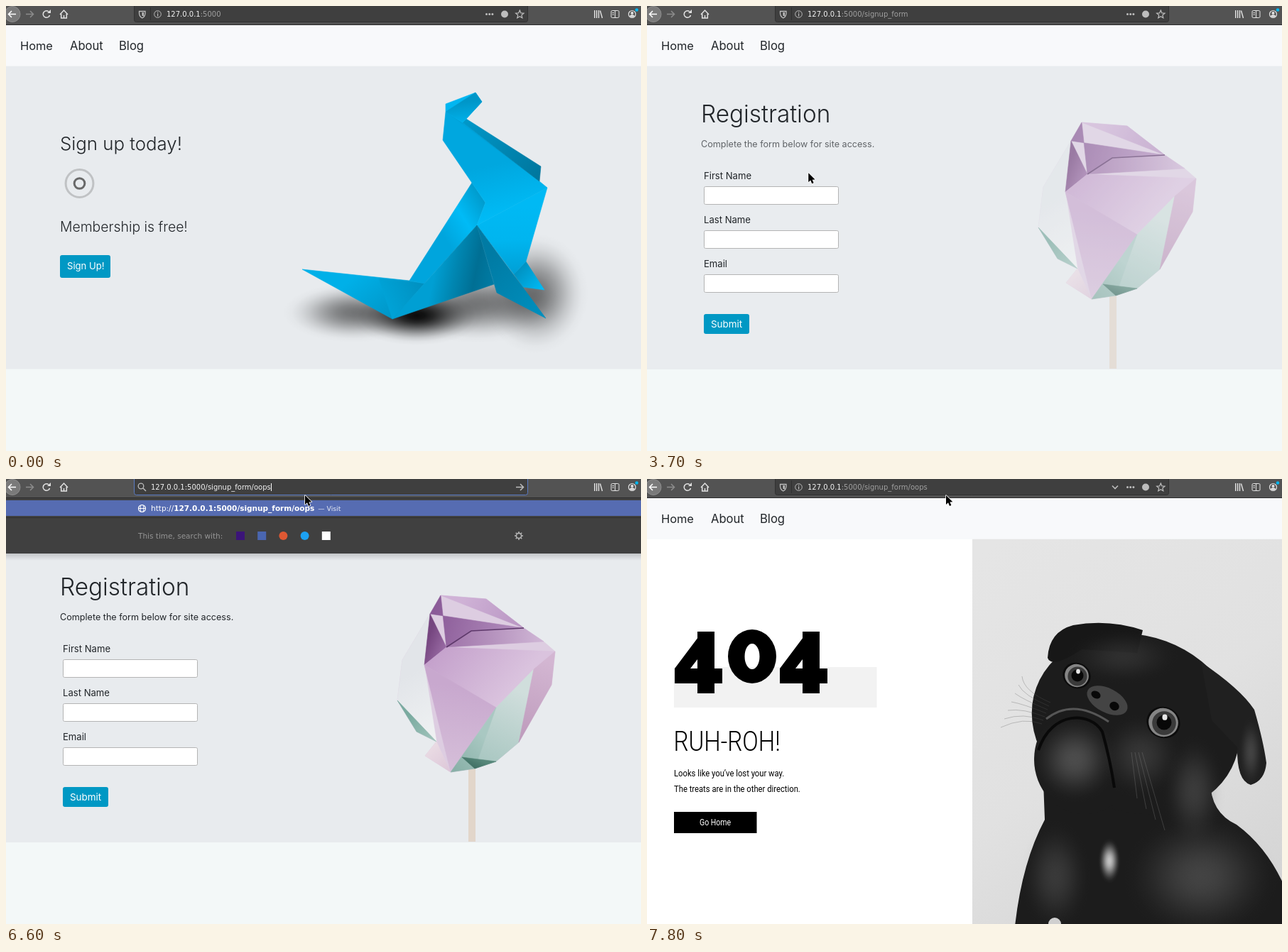
Write an HTML page with a canvas that moves like this. It is 894 px wide and 627 px high and loops after 8 s.

```html
<!DOCTYPE html>
<html lang="en">
<head>
<meta charset="utf-8">
<title>Sign-up demo</title>
<style>
html, body { margin: 0; width: 100%; height: 100%; overflow: hidden; background: #f3f8f8; }
canvas { display: block; }
</style>
</head>
<body>
<canvas id="stage" width="894" height="627"></canvas>
<script>
const c = document.getElementById('stage').getContext('2d');
const W = 894, H = 627, TOP = 84.5, LOOP = 8000;
const PAGE = '#f3f8f8', HERO = '#e8ebee', BLUE = '#0098c4', INK = '#212529';
const LIGHT = '#e2e2e2', SOFT = '#bdbdbd';
const SANS = 'Inter, sans-serif', UI = '"DejaVu Sans", sans-serif', SLIM = 'Roboto, sans-serif';

// ---------- helpers ----------
function bezier(x1, y1, x2, y2) {
  const at = (s, a, b) => 3 * (1 - s) * (1 - s) * s * a + 3 * (1 - s) * s * s * b + s * s * s;
  return x => {
    if (x <= 0) return 0;
    if (x >= 1) return 1;
    let lo = 0, hi = 1;
    for (let i = 0; i < 24; i++) {
      const mid = (lo + hi) / 2;
      if (at(mid, x1, x2) < x) lo = mid; else hi = mid;
    }
    return at(lo, y1, y2);
  };
}
const ease = bezier(.25, .1, .25, 1);
const grow = bezier(0, .2, .8, 1);
const fade = bezier(.2, 0, .8, 1);
const mix = (a, b, k) => a + (b - a) * k;

function rect(x, y, w, h, color) {
  c.fillStyle = color;
  c.fillRect(x, y, w, h);
}
function box(x, y, w, h, r, fill, edge) {
  c.beginPath();
  c.roundRect(x, y, w, h, r);
  if (fill) { c.fillStyle = fill; c.fill(); }
  if (edge) { c.strokeStyle = edge; c.lineWidth = 1; c.stroke(); }
}
function trace(p, closed) {
  c.beginPath();
  for (let i = 0; i < p.length; i += 2) c.lineTo(p[i], p[i + 1]);
  if (closed) c.closePath();
}
function poly(p, fill) {
  trace(p, true);
  c.fillStyle = fill;
  c.fill();
}
function line(p, color, width = 1) {
  trace(p);
  c.strokeStyle = color;
  c.lineWidth = width;
  c.stroke();
}
function shape(d, fill) {
  c.fillStyle = fill;
  c.fill(new Path2D(d));
}
function curve(d, color, width) {
  c.strokeStyle = color;
  c.lineWidth = width;
  c.stroke(new Path2D(d));
}
function disc(x, y, rx, ry, fill, turn = 0) {
  c.beginPath();
  c.ellipse(x, y, rx, ry, turn, 0, 7);
  c.fillStyle = fill;
  c.fill();
}
function ring(x, y, r, color, width = 1, from = 0, to = 2 * Math.PI) {
  c.beginPath();
  c.arc(x, y, r, from, to);
  c.strokeStyle = color;
  c.lineWidth = width;
  c.stroke();
}
function text(s, x, y, font, color) {
  c.font = font;
  c.fillStyle = color;
  c.fillText(s, x, y);
  return x + c.measureText(s).width;
}
function shade(x0, y0, x1, y1, colors) {
  const g = c.createLinearGradient(x0, y0, x1, y1);
  colors.forEach((k, i) => g.addColorStop(i / (colors.length - 1), k));
  return g;
}
function glow(x, y, rx, ry, grey, alpha) {
  c.save();
  c.translate(x, y);
  c.scale(rx, ry);
  const g = c.createRadialGradient(0, 0, 0, 0, 0, 1);
  for (let k = 0; k <= 1; k += .125) {
    const a = alpha * (1 + Math.cos(Math.PI * k)) / 2;
    g.addColorStop(k, `rgba(${grey},${grey},${grey},${a})`);
  }
  disc(0, 0, 1, 1, g);
  c.restore();
}
function veil(y, h, color, alpha) {
  c.globalAlpha = alpha;
  rect(0, y, W, h, color);
  c.globalAlpha = 1;
}
// Folded paper: each facet names its corners and is shaded
// from the middle of its first edge to its last corner.
function fold(corners, facets) {
  for (const [names, ...colors] of facets) {
    const p = [...names].map(k => corners[k]), [a, b] = p, z = p[p.length - 1];
    const ink = colors[1] ? shade((a[0] + b[0]) / 2, (a[1] + b[1]) / 2, z[0], z[1], colors) : colors[0];
    poly(p.flat(), ink);
    c.strokeStyle = ink;
    c.lineWidth = .6;
    c.stroke();
  }
}

// ---------- browser bar ----------
function arrow(x, dir, color) {
  const y = 11.5;
  line([x - 5 * dir, y, x + 5 * dir, y], color, 1.5);
  line([x + dir, y - 4.5, x + 5.5 * dir, y, x + dir, y + 4.5], color, 1.5);
}
function star(x, y) {
  const p = [];
  for (let i = 0; i < 10; i++) {
    const a = i * Math.PI / 5 - Math.PI / 2, r = i % 2 ? 2.7 : 6;
    p.push(x + r * Math.cos(a), y + r * Math.sin(a));
  }
  trace(p, true);
  c.strokeStyle = SOFT;
  c.lineWidth = 1.2;
  c.stroke();
}
function searchField(t) {
  ring(190, 10, 3.8, SOFT, 1.3);
  line([193, 13, 197, 17], SOFT, 1.5);
  const end = text(address(t), 204, 15, '10px ' + UI, '#f2f2f2');
  rect(Math.round(end), 6, 1, 11, '#fff');
  arrow(723, 1, SOFT);
}
function addressField(t) {
  curve('M187.5 7.5H196Q196.5 15 191.8 17Q187 15 187.5 7.5Z', SOFT, 1.3);
  rect(191.5, 9, 2.5, 5, SOFT);
  rect(203, 2, 1, 18, '#303030');
  ring(213.5, 11.5, 4.8, SOFT);
  rect(213, 10.5, 1.2, 4, SOFT);
  rect(213, 8.3, 1.2, 1.2, SOFT);
  const host = '127.0.0.1';
  const x = text(host, 226, 15, '10px ' + UI, '#f2f2f2');
  text(address(t).slice(host.length), x, 15, '10px ' + UI, '#a0a0a0');
  if (t >= 4100) line([655, 9.5, 659, 13.5, 663, 9.5], SOFT, 1.6);
  for (let i = 0; i < 3; i++) disc(676.5 + i * 4.2, 11.5, 1.5, 1.5, SOFT);
  disc(702, 11.5, 5, 5, SOFT);
  star(723.3, 12);
}
function toolbar(t, typing) {
  rect(0, 0, W, 27, '#535353');
  rect(0, 26, W, 1, '#2b2b2b');
  disc(9, 11.5, 11, 11, '#7a7a7a');
  ring(9, 11.5, 11, '#8e8e8e');
  arrow(9, -1, '#fff');
  arrow(33, 1, '#8c8c8c');
  ring(57, 11.5, 4.7, LIGHT, 1.6, .3, 5.4);
  poly([58, 10, 63, 10, 63, 5], LIGHT);
  curve('M76 12L81.5 6L87 12M77.7 11V17H85.3V11M81.5 17V13', LIGHT, 1.5);
  box(180.5, -3.5, 554, 26, 3, '#3f3f3f', typing ? '#5b7bc4' : '#323232');
  if (typing) searchField(t); else addressField(t);

  for (let i = 0; i < 3; i++) rect(828 + i * 2.9, 6, 1.4, 11, LIGHT);
  line([836.5, 6.5, 839.5, 17], LIGHT, 1.4);
  box(852, 6.5, 11, 10, 1.5, null, LIGHT);
  curve('M857.5 7V16M853.5 9.5H856M853.5 12H856', LIGHT, 1);
  ring(881.5, 11.5, 5, LIGHT, 1.2);
  disc(881.5, 10, 2, 2, LIGHT);
  disc(881.5, 14, 3.2, 1.7, LIGHT);
  disc(888, 5.5, 2.3, 2.3, '#00b7f0');
}
function address(t) {
  let s = '127.0.0.1:5000';
  if (t >= 3000) s += '/signup_form';
  if (t >= 5500) s += '/';
  if (t >= 5900) s += t < 6300 ? 'o' : t < 6600 ? 'oop' : 'oops';
  return s;
}
function dropdown(t) {
  rect(0, 105, W, 10, shade(0, 105, 0, 115, ['rgba(0,0,0,.16)', 'rgba(0,0,0,0)']));
  rect(0, 24, W, 81, '#404040');
  rect(0, 30, W, 22, '#566cb2');
  rect(0, 54, W, 1, '#2f2f2f');
  ring(191.5, 41.5, 5, '#fff', 1.2);
  line([186.5, 41.5, 196.5, 41.5], '#fff');
  c.beginPath();
  c.ellipse(191.5, 41.5, 2.3, 5, 0, 0, 7);
  c.stroke();
  let x = text('http://', 204, 45, '10.5px ' + UI, '#fff');
  x = text(address(t), x, 45, 'bold 10.5px ' + UI, '#fff');
  text('— Visit', x + 5, 45, '9.3px ' + UI, '#e8ebf5');
  text('This time, search with:', 186, 84, '10.5px ' + UI, '#949494');
  ['#3b1478', '#4a66b0', '#de5833', '#1da1f2', '#fff'].forEach((color, i) => {
    const round = i === 2 || i === 3;
    box(324 + 30.2 * i, 74, 12, 12, round ? 6 : 0, color);
  });
  ring(722, 80, 3.6, '#b5b5b5', 1.6);
  for (let i = 0; i < 8; i++) {
    const a = i * Math.PI / 4, u = Math.cos(a), v = Math.sin(a);
    line([722 + 4 * u, 80 + 4 * v, 722 + 6 * u, 80 + 6 * v], '#b5b5b5', 1.5);
  }
}
function nav() {
  rect(0, 27, W, TOP - 27, '#f8f9fb');
  text('Home', 20, 61.5, '16.4px ' + SANS, INK);
  text('About', 90, 61.5, '16.6px ' + SANS, INK);
  text('Blog', 159, 61.5, '16.6px ' + SANS, INK);
}

// ---------- home ----------
function ripple(t) {
  for (const lag of [0, .5]) {
    const p = (Math.min(t, 2400) / 1000 + .18 + lag) % 1;
    c.globalAlpha = 1 - fade(p);
    ring(103.5, 250, 24 * grow(p), '#565656', 3);
  }
  c.globalAlpha = 1;
}
const DINO = {
  A: [619, 149], B: [619, 138], C: [661, 122], D: [670, 135], E: [643, 164], F: [753, 226],
  G: [751, 247], H: [762, 256], I: [675, 277], J: [615, 189], K: [656, 249], L: [568, 387],
  M: [589, 391], N: [544, 441], O: [417, 371], P: [663, 309], Q: [687, 392], R: [691, 404],
  S: [760, 440], T: [732, 360], U: [758, 400], V: [715, 378], W: [728, 396], X: [525, 384],
  Y: [648, 159]
};
function dinosaur() {
  glow(490, 432, 100, 42, 0, .5);
  glow(578, 436, 95, 42, 0, .95);
  glow(665, 420, 115, 55, 0, .5);
  glow(745, 405, 75, 85, 0, .5);
  fold(DINO, [
    ['OLMN', '#00b0e8', '#0095c6'],
    ['NXM', '#00a2d6', '#008fbf'],
    ['KLMPI', '#00a5dd', '#00bbf6', '#009bcd'],
    ['TVWU', '#0092c2', '#00bdf8'],
    ['PHTV', '#00b9f4', '#00b5ef', '#009fd5'],
    ['NPQ', '#009fd3', '#0086b1', '#006f94', '#007ca5'],
    ['PRS', '#007ba4', '#0090bf'],
    ['IJAEGHP', '#00a7df', '#00bcf7'],
    ['AEG', '#00a3da', '#00a1d7'],
    ['EYFG', '#0098c9', '#00759c'],
    ['ABCDYE', '#00b6f1'],
    ['ACDE', '#0096c8', '#00b0e9']
  ]);
}
function home(t, spot) {
  rect(0, TOP, W, 427, HERO);
  text('Sign up today!', 76, 202.5, '300 25.8px ' + SANS, INK);
  text('Membership is free!', 76, 317.5, '300 19.4px ' + SANS, INK);
  box(76, 351, 71, 32, 3, spot && spot.hand ? '#0083a8' : BLUE);
  text('Sign Up!', 86, 371, '13.1px ' + SANS, '#fff');
  ripple(t);
  dinosaur();
}

// ---------- registration ----------
const ROSE = {
  a: [612, 164], b: [676, 169], c: [729, 210], d: [757, 229], e: [773, 243], f: [768, 290],
  g: [722, 371], h: [690, 322], i: [660, 408], j: [626, 413], k: [590, 390], l: [551, 312],
  m: [558, 255], n: [597, 190], o: [589, 262], p: [620, 237], q: [743, 268], r: [606, 370],
  s: [655, 214], u: [578, 356], w: [642, 392], x: [690, 398]
};
function rose() {
  rect(651, 400, 10, 111, '#e2d6ca');
  fold(ROSE, [
    ['abcdefgxijkrulmn', '#ddcde1'],
    ['lmnor', '#e2e5e9', '#f0f2f3'],
    ['lur', '#79aa9f', '#a3c5bd'],
    ['napsc', '#8a5a97', '#b591c0'],
    ['abc', '#cfb2d6', '#b894c2'],
    ['nop', '#75457f', '#9a6ca5'],
    ['pscd', '#a47bae', '#d0b7d6'],
    ['opeh', '#c5a2cc', '#dac3de'],
    ['ohj', '#c8a8ce', '#d6bfd9'],
    ['hqgxi', '#d0dedc', '#a4c4be'],
    ['hij', '#a9c8c2', '#86aea5'],
    ['wxi', '#568679', '#3f6f63'],
    ['qefg', '#d3b6d2', '#bd9abb'],
    ['krj', '#e9dae3', '#dcc6d8']
  ]);
  line([...ROSE.p, ...ROSE.s, ...ROSE.c], '#5e396b', 1.6);
}
function registration(t) {
  rect(0, TOP, W, 427.5, HERO);
  const slow = ease((t - 2900) / 2000), quick = ease((t - 2700) / 1000);
  rose();
  text('Complete the form below for site access.', 76, 199, '12.6px ' + SANS, INK);
  veil(TOP, 427.5, HERO, 1 - slow);

  c.save();
  c.globalAlpha = quick;
  text('Registration', 76, 164 - 46 * (1 - quick), '300 33.3px ' + SANS, INK);
  c.translate(-290 * (1 - quick), 0);
  ['First Name', 'Last Name', 'Email'].forEach((label, i) => {
    const y = 243.5 + 62 * i;
    text(label, 80, y, '13.1px ' + SANS, INK);
    box(80.5, y + 11, 189, 25, 2, '#fff', '#b4b4b4');
  });
  box(80, 434, 64, 28, 3, BLUE);
  text('Submit', 90, 453, '13.4px ' + SANS, '#fff');
  c.restore();
}

// ---------- not found ----------
function slim(s, x, y, size, color, weight = 400) {
  c.save();
  c.translate(x, y);
  c.scale(.865, 1); // condensed cut of the face
  text(s, 0, 0, `${weight} ${size}px ${SLIM}`, color);
  c.restore();
}
function bigFour(x) {
  rect(x + 32, 215, 24, 87, '#000');
  rect(x, 267, 67, 21, '#000');
  poly([x, 267, x + 39, 215, x + 39, 245, x + 22, 267], '#000');
}
function bigZero(x, y) {
  c.beginPath();
  c.ellipse(x, y, 34, 38, 0, 0, 7);
  c.ellipse(x, y, 10.5, 18, 0, 0, 7);
  c.fillStyle = '#000';
  c.fill('evenodd');
}
function eye(x, y, r) {
  disc(x, y, r + 3, r + 1, '#0c0c0c', .4);
  disc(x, y, r, r - 1, '#858585', .4);
  disc(x + 1, y + 1, r * .8, r * .8, '#3a3a3a');
  disc(x + 1, y, r * .5, r * .5, '#080808');
  disc(x + 2, y - r * .35, r * .17, r * .2, '#e6e6e6');
}
function dog() {
  const coat = '#1c1c1c';
  rect(458, TOP, 436, 543, shade(500, 85, 860, 627, ['#e5e5e5', '#e1e1e1', '#d3d3d3']));
  // body, head, muzzle, ears
  shape('M518 630Q528 540 560 480L557 400H796Q783 465 830 487Q875 520 900 580V630Z', coat);
  disc(688, 345, 149, 124, coat, .35);
  disc(616, 395, 71, 77, coat);
  shape('M612 240Q570 268 564 252Q566 215 600 206Q650 197 698 213L690 245Z', '#171717');
  shape('M780 258Q835 295 855 325Q868 370 872 400Q870 425 850 431Q830 425 831 378L795 340Z', '#202020');
  // sheen on the fur
  glow(670, 250, 80, 40, 90, .3);
  glow(602, 395, 62, 62, 115, .55);
  glow(695, 390, 60, 60, 85, .45);
  glow(850, 385, 18, 50, 100, .5);
  glow(770, 440, 45, 80, 105, .4);
  glow(575, 560, 50, 80, 100, .4);
  glow(780, 560, 110, 90, 115, .45);
  // face
  curve('M551 382C570 325 625 328 641 356Q652 395 658 435', '#090909', 4);
  curve('M562 338Q600 308 650 342', '#565656', 3);
  disc(648, 312, 31, 17, '#444', .48);
  disc(632, 304, 7, 5, '#080808', .5);
  disc(658, 320, 7, 6, '#080808', .5);
  eye(605, 277, 17);
  eye(727, 343, 21);
  glow(651, 538, 16, 32, 225, .85);
  disc(574, 627, 9, 9, '#d0d0d0');
  for (let i = 0; i < 7; i++) {
    curve(`M${556 + i * 2} ${345 - i * 5}Q530 ${335 - i * 6} ${498 + i * 5} ${350 - i * 12}`, 'rgba(90,90,90,.45)', .7);
  }
  for (let i = 0; i < 4; i++) {
    line([682 + i * 5, 385, 690 + i * 13, 450 + i * 15], 'rgba(150,150,150,.4)', .7);
  }
}
function notFound(t) {
  const p = ease((t - 6810) / 900);
  c.save();
  c.translate(0, 542.5 * (1 - p));
  rect(0, TOP, W, 543, '#fff');
  rect(38, 265, 285.5, 57, '#f2f2f2');
  bigFour(39);
  bigZero(148, 250);
  bigFour(187);
  slim('RUH-ROH!', 37.5, 382.5, 38.3, '#000', 300);
  slim('Looks like you’ve lost your way.', 38, 419, 13, '#000');
  slim('The treats are in the other direction.', 38, 441, 13, '#000');
  rect(38, 469, 116.5, 30, '#000');
  slim('Go Home', 74, 488, 12.2, '#fff');
  dog();
  veil(TOP, 543, PAGE, 1 - p);
  c.restore();
}

// ---------- pointer ----------
const STOPS = [
  [1000, 20, 112], [1700, 126, 246], [1900, 161, 320], [2300, 120, 368],
  [3400, 120, 368], [4200, 406, 14], [4700, 406, 14], [4900, 421, 23], [LOOP, 421, 23]
];
function pointer(t) {
  if (t < 1000 || (t >= 3000 && t < 3400)) return null;
  const i = STOPS.findIndex(stop => stop[0] > t);
  const [t0, x0, y0] = STOPS[i - 1], [t1, x1, y1] = STOPS[i];
  const k = (t - t0) / (t1 - t0), x = mix(x0, x1, k), y = mix(y0, y1, k);
  return { x, y, hand: t < 3000 && x < 147 && y > 351, beam: y < 22 };
}
function drawPointer({ x, y, hand, beam }) {
  c.save();
  c.translate(x, y);
  c.lineJoin = 'round';
  if (beam) {
    const bar = 'M-3 -5.5H3M0 -5.5V5.5M-3 5.5H3';
    curve(bar, '#111', 3);
    curve(bar, '#fff', 1.2);
  } else {
    const d = hand
      ? 'M-1 0H1L2 6L8 7L9 12L7 17H0L-5 10L-3 9L-1 11Z'
      : 'M0 0V13L3 10.3L5 15L7.4 14L5.4 9.5L9.3 9.2Z';
    curve(d, hand ? '#000' : '#fff', 1.6);
    shape(d, hand ? '#fff' : '#000');
  }
  c.restore();
}

// the screen refreshes ten times a second, unevenly towards the end
function step(ms) {
  const t = Math.floor(ms / 100) * 100;
  return t < 7000 ? t : [7800, 7600, 7500, 7300, 7200, 7000].find(k => k <= t);
}
function draw(ms) {
  const t = step(ms), spot = pointer(t), typing = t >= 5500 && t < 6800;
  rect(0, 0, W, H, PAGE);
  if (t < 3000) home(t, spot);
  else if (t < 7000) registration(t);
  else notFound(t);
  nav();
  if (typing) dropdown(t);
  toolbar(t, typing);
  if (spot) drawPointer(spot);
}
const start = performance.now();
function tick() {
  draw((performance.now() - start) % LOOP);
  requestAnimationFrame(tick);
}
tick();
</script>
</body>
</html>
```
